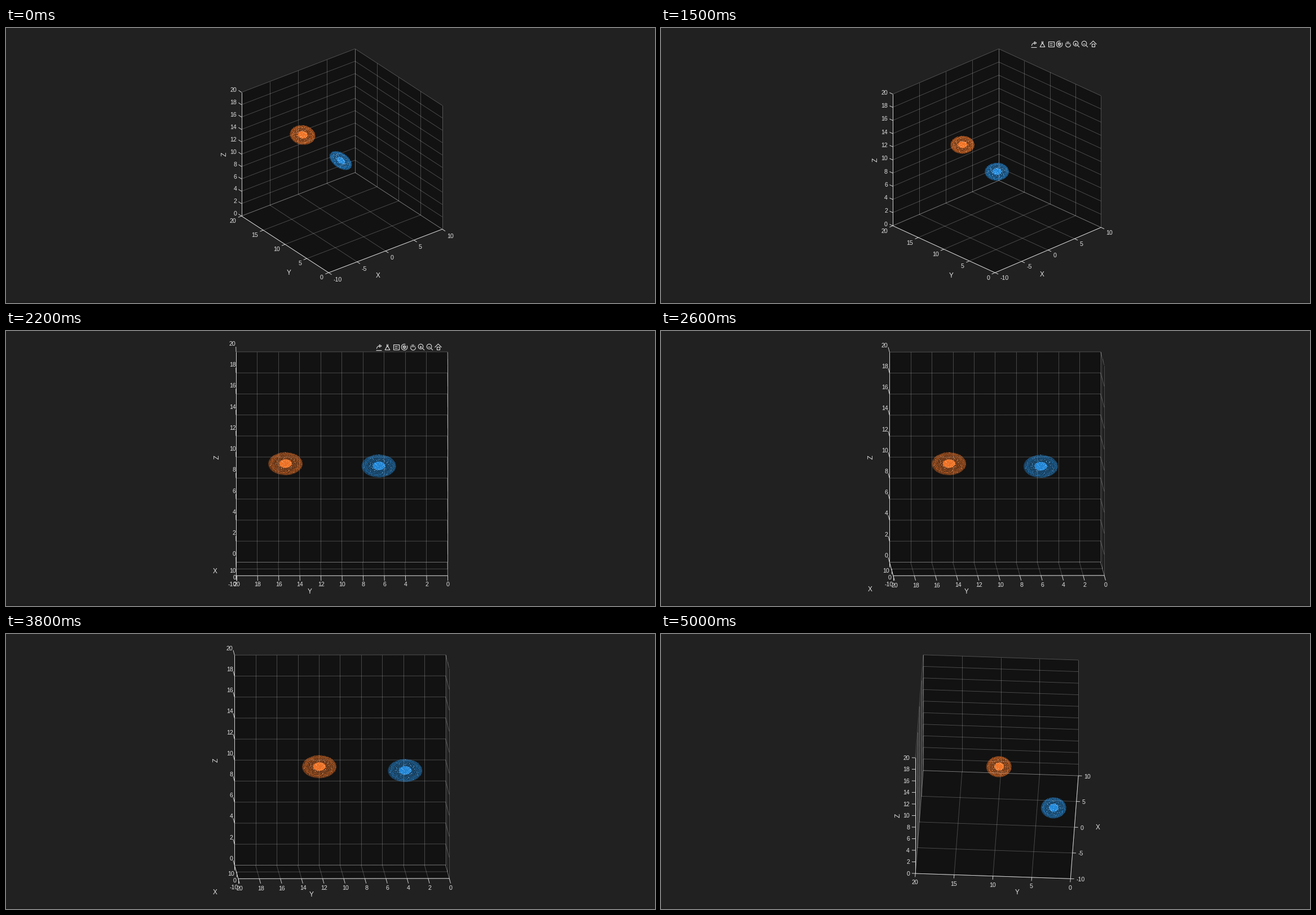
Animation, 1151 px wide and 487 px high, one loop 5.1 s. Source, as a matplotlib script:

```python
import numpy as np
import matplotlib.pyplot as plt
from matplotlib.animation import FuncAnimation
from matplotlib.collections import LineCollection
from matplotlib.patches import Polygon, Rectangle

W, H, DPI = 1151, 487, 64
FRAMES, STEP = 51, 100
BACK, WALL, INK = "#212121", "#121212", "#e2e2e2"
BLUE, ORANGE = "#268cdd", "#f57729"
CENTER = np.array([595.2, 234.6])
BOX_HEIGHT = 396.4
LOW = np.array([-10, 0, 0])

# the camera is dragged between these (seconds, azimuth, elevation)
CAMERA = np.array([(1.4, -37.5, 30), (1.8, -63.4, 15.4), (2.2, -90.1, 3.67),
                   (2.4, -91, 3.67), (4.2, -91, 3.67), (4.3, -86.3, 19),
                   (4.6, -87.1, 41.7)])

plt.rcParams["font.family"] = "Liberation Sans"
fig = plt.figure(figsize=(W / DPI, H / DPI), dpi=DPI, facecolor=BACK)
ax = fig.add_axes([0, 0, 1, 1])

rng = np.random.default_rng(4)
DOTS = 1500
index = np.arange(DOTS)
height = 1 - (2 * index + 1) / DOTS
turn = index * np.pi * (3 - np.sqrt(5))
ring_radius = np.sqrt(1 - height ** 2)
SPHERE = np.c_[ring_radius * np.cos(turn), ring_radius * np.sin(turn), height]
SPHERE *= rng.uniform(0.8, 1, (DOTS, 1))
SPECKS = SPHERE[::25] * rng.uniform(0.35, 1, (DOTS // 25, 1))
RADII = np.array([1.63, 1.63, 1.08])


def arc(x, y, r, sides=24, start=0, sweep=360):
    a = np.radians(start + np.linspace(0, sweep, sides + 1))
    return np.c_[x + r * np.cos(a), y + r * np.sin(a)]


def dash(x, y, dx, dy):
    return np.array([(x, y), (x + dx, y + dy)])


def toolbar_icons():
    lens = [arc(-1, -1, 4.3), dash(2.2, 2.2, 3.3, 3.3), dash(-3, -1, 4, 0)]
    export = [dash(-5, 5, 10, 0), arc(1, 3, 5, 8, 180, 90), arc(2, -2, 2.5, 3)]
    brush = [arc(0, 2.5, 5, 3, -90), dash(-1, -5.5, 0, 5), dash(1, -5.5, 0, 5)]
    tip = [arc(0.5, 0, 6.8, 4, 45), dash(-2, -1.5, 5, 0), dash(-2, 1.5, 5, 0)]
    rotate = [arc(0, 0, 5.3, 24, -30, 320), arc(0, 0, 2.7, 6, 30)]
    rotate += [dash(0, 0, *tip_of) for tip_of in arc(0, 0, 2.7, 3, 90)]
    hand = [arc(0.5, 1, 4.4, 12, -10, 200)]
    hand += [dash(x, 0, 0.2 * x, -5 + 0.3 * x * x) for x in (-3, -1, 1, 3)]
    home = [arc(0, 0.5, 6, 2, 180, 180), arc(0, 2, 4.2, 4, 45)]
    return [export, brush, tip, rotate, hand, lens + [dash(-1, -3, 0, 4)], lens, home]


ICONS = toolbar_icons()


def unit(v):
    return v / np.hypot(*v)


def camera_matrix(azimuth, elevation):
    """Orthographic view scaled so the box always fills the same height."""
    az, el = np.radians([azimuth, elevation])
    ca, sa, ce, se = np.cos(az), np.sin(az), np.cos(el), np.sin(el)
    scale = BOX_HEIGHT / (ce + se * (abs(ca) + abs(sa))) / 20
    return scale * np.array([[ca, se * sa], [sa, -se * ca], [0, -ce]]) * [1.004, 1]


def put_lines(segments, color, width=1.0, alpha=1.0):
    ax.add_collection(LineCollection(segments, colors=color, alpha=alpha,
                                     linewidths=width * 72 / DPI))


def put_text(x, y, text, ha="center", size=10.67, **style):
    ax.text(x, y, text, ha=ha, color=INK, fontsize=size * 72 / DPI, **style)


def draw_planes(project, ticks, back_y):
    grid = []
    for normal, value in ((2, 0), (0, 10), (1, back_y)):
        a, b = [k for k in range(3) if k != normal]
        corners = np.zeros((4, 3))
        corners[:, normal] = value
        corners[:, a] = LOW[a] + np.array([0, 20, 20, 0])
        corners[:, b] = LOW[b] + np.array([0, 0, 20, 20])
        ax.add_patch(Polygon(project(corners), fc=WALL, ec="none"))
        for along, across in ((a, b), (b, a)):
            for tick in ticks[along]:
                ends = np.zeros((2, 3))
                ends[:, normal] = value
                ends[:, along] = tick
                ends[:, across] = LOW[across], LOW[across] + 20
                grid.append(project(ends))
    put_lines(grid, "white", 0.9, 0.25)


def title_offsets(azimuth, flat, passed):
    c = np.cos(np.radians(azimuth))
    z_title = (-34 if flat else -31.5, 0)
    if passed:
        return (-38, 35 * (-90 - azimuth)), (-57.5, 28), z_title
    x_title = 48 - 125 * c + 60 * c * c, np.clip(140 * (c - 0.09), 0, 43)
    return x_title, (43 - 58 * c * c, 28 + 34 * c * c), z_title


def draw_rulers(project, ticks, azimuth, flat, passed):
    x_dir = unit(project([10, 0, 0]) - project([-10, 0, 0]))
    y_dir = unit(project([0, 20, 0]) - project([0, 0, 0]))
    rulers = (((0, 20 if passed else 0, 0), np.array([0, 1]) if passed else -y_dir),
              ((-10, 0, 0), -x_dir),
              ((10 if passed else -10, 20, 0), x_dir if passed else y_dir))
    titles = title_offsets(azimuth, flat, passed)
    for axis, (start, out) in enumerate(rulers):
        points = np.tile(np.array(start, float), (len(ticks[axis]), 1))
        points[:, axis] = ticks[axis]
        points = project(points)
        put_lines([points[[0, -1]]], INK, 0.9)
        put_lines([(p, p + out * (9 if flat else 6.3)) for p in points], INK, 0.9)

        dx, dy = out
        centered = axis == 1 and dx > -0.5
        align = "left" if dx > 0.5 else "center" if centered else "right"
        for (x, y), value in zip(points, ticks[axis]):
            put_text(x + 10 * dx, y + 15 * dy + 8 * abs(dx * dy) + 3.8,
                     str(value), align)
        x, y = points[[0, -1]].mean(axis=0) + titles[axis]
        if axis == 2:
            put_text(x + 1, y, "Z", size=11.7, rotation=90, va="center")
        else:
            put_text(x, y + 4.2, "XY"[axis], size=11.7)


def draw_ball(middle, matrix, color, light, stretch, tilt):
    c, s = np.cos(np.radians(tilt)), np.sin(np.radians(tilt))
    view = RADII[:, None] * matrix @ np.diag(stretch) @ np.array([[c, s], [-s, c]])
    outline = arc(0, 0, 1, 48) @ np.linalg.cholesky(view.T @ view).T

    def layer(size, fill, dot):
        ax.add_patch(Polygon(middle + size * outline, fc=color, ec="none", alpha=fill))
        ax.plot(*(middle + size * SPHERE @ view).T, ",", color=color, alpha=dot)

    layer(1, 0.32, 0.28)
    layer(0.36, 0.5, 0.4)
    ax.plot(*(middle + SPECKS @ view).T, ",", color=light, alpha=0.7)


def draw_toolbar(left):
    for k, strokes in enumerate(ICONS):
        put_lines([stroke + [left + 15 * k, 28] for stroke in strokes], INK, 1.1)


def update(i):
    t = i * STEP / 1000
    ax.cla()
    ax.set(xlim=(-0.5, W - 0.5), ylim=(H - 0.5, -0.5))
    ax.axis("off")
    ax.add_patch(Rectangle((-1, 483.5), W + 2, 5, fc="#1e1e1f", ec="none"))

    azimuth, elevation = (np.interp(t, CAMERA[:, 0], CAMERA[:, k]) for k in (1, 2))
    matrix = camera_matrix(azimuth, elevation)

    def project(points):
        return CENTER + (np.asarray(points, float) - [0, 10, 10]) @ matrix

    passed, flat = azimuth < -90, elevation < 8
    ticks = (range(-10, 11, 10 if flat else 5), range(0, 21, 2 if flat else 5),
             range(0, 21, 2))
    draw_planes(project, ticks, 0 if passed else 20)
    draw_rulers(project, ticks, azimuth, flat, passed)

    # both balls start out distorted and settle quickly
    k = max(0, 1 - t / 0.4)
    orange = project([0, 19.75 - 2 * t, 10]) + np.array([5.5, 3.5]) * k
    blue = project([-0.12 - 1.5 * t, 9.82 - 1.5 * t, 10]) - np.array([2.5, 1.5]) * k
    draw_ball(orange, matrix, ORANGE, "#ffc79a", (1 + 0.09 * k, 1 + 0.09 * k), 10 * k)
    draw_ball(blue, matrix, BLUE, "#a9d8ff", (1 + 0.07 * k, 1 - 0.17 * k), 35 * k)

    if 1.35 < t < 2.35:
        draw_toolbar(661)
    elif 3.85 < t < 4.65:
        draw_toolbar(674)
    return []


anim = FuncAnimation(fig, update, frames=FRAMES, interval=STEP,
                     init_func=lambda: [], repeat=True)
plt.show()
```
